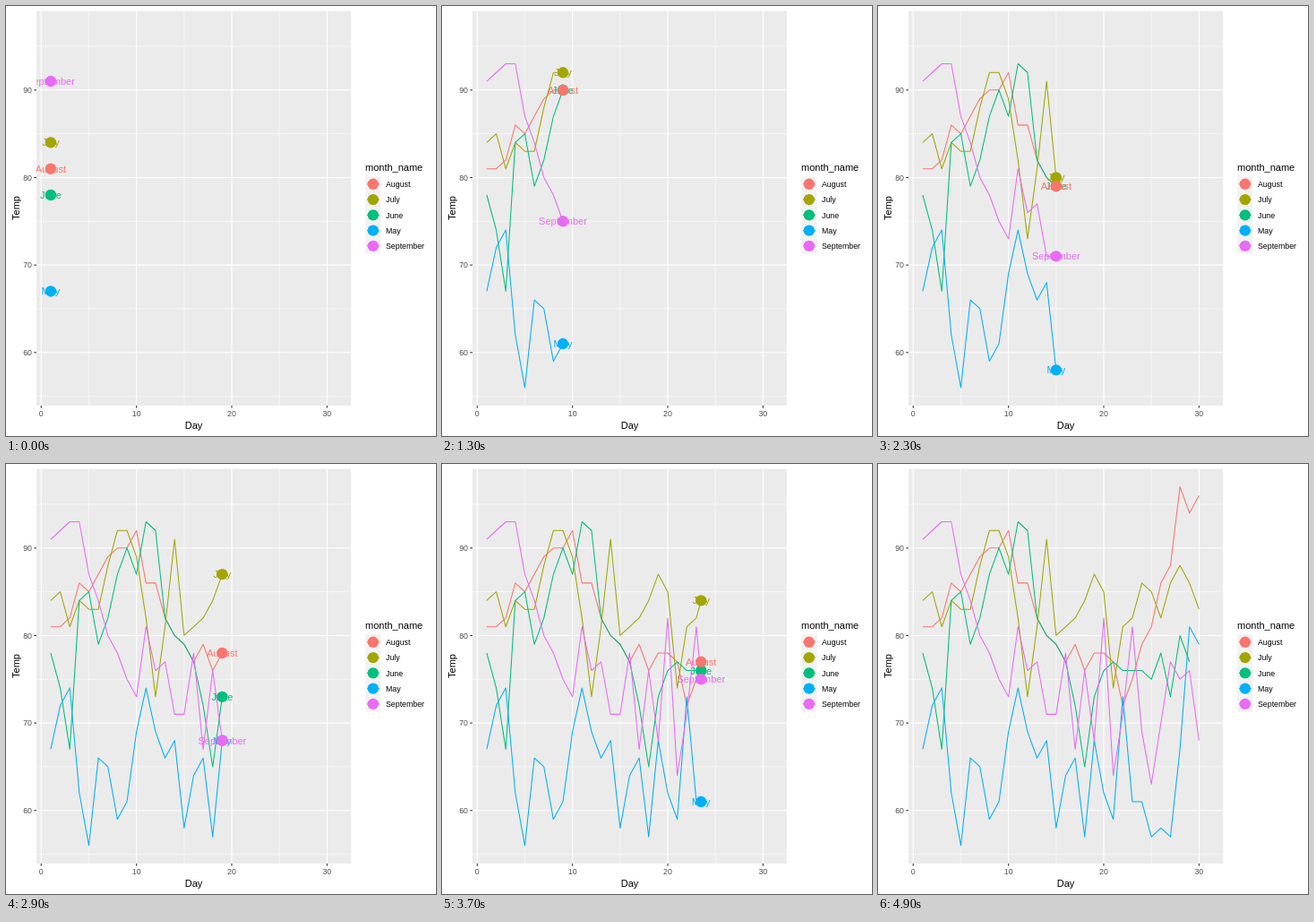
Recreate the animation shown at these times as an HTML page. Size 480x480 px, loop 5000 ms.

```html
<!DOCTYPE html>
<html lang="en">
<head>
<meta charset="utf-8">
<title>Temperature by day</title>
<style>
  html, body { margin: 0; width: 100%; height: 100%; overflow: hidden; background: #fff; }
  svg { display: block; width: 100vw; height: 100vh; }
  text { font-family: "Liberation Sans", Arial, sans-serif; font-size: 11px; }
  .small { font-size: 8.8px; }
  .mid { text-anchor: middle; }
  .end { text-anchor: end; }
  .axis { fill: #4d4d4d; }
</style>
</head>
<body>
<svg id="chart" viewBox="0 0 480 480">
  <clipPath id="panel"><rect x="34" y="5.5" width="351" height="440.5"/></clipPath>
</svg>
<script>
const STEP = 100, FRAMES = 50, DAYS = 31;
const RADIUS = 6.2, LINE = 1.07;
const LEFT = 34, TOP = 5.5, RIGHT = 385, BOTTOM = 446;

const months = [
  { name: "May", color: "#00B0F6", temps: [67, 72, 74, 62, 56, 66, 65, 59, 61, 69, 74, 69, 66, 68, 58, 64, 66, 57, 68, 62, 59, 73, 61, 61, 57, 58, 57, 67, 81, 79, 76] },
  { name: "June", color: "#00BF7D", temps: [78, 74, 67, 84, 85, 79, 82, 87, 90, 87, 93, 92, 82, 80, 79, 77, 72, 65, 73, 76, 77, 76, 76, 76, 75, 78, 73, 80, 77, 83] },
  { name: "July", color: "#A3A500", temps: [84, 85, 81, 84, 83, 83, 88, 92, 92, 89, 82, 73, 81, 91, 80, 81, 82, 84, 87, 85, 74, 81, 82, 86, 85, 82, 86, 88, 86, 83, 81] },
  { name: "August", color: "#F8766D", temps: [81, 81, 82, 86, 85, 87, 89, 90, 90, 92, 86, 86, 82, 80, 79, 77, 79, 76, 78, 78, 77, 72, 75, 79, 81, 86, 88, 97, 94, 96, 94] },
  { name: "September", color: "#E76BF3", temps: [91, 92, 93, 93, 87, 84, 80, 78, 75, 73, 81, 76, 77, 71, 71, 78, 67, 76, 68, 82, 64, 71, 81, 69, 63, 70, 77, 75, 76, 68], keepsEnd: true }
];
const byName = [...months].sort((a, b) => a.name < b.name ? -1 : 1);

const px = day => 39.3 + 10.635 * day;
const py = temp => 93.8 + 9.767 * (90 - temp);

// Each day lands on a whole step; halves round down.
const stepOf = day => Math.ceil((day - 1) * (FRAMES - 1) / (DAYS - 1) - 0.5);

const chart = document.getElementById("chart");

function add(parent, tag, attrs, content) {
  const el = document.createElementNS("http://www.w3.org/2000/svg", tag);
  for (const key in attrs) el.setAttribute(key, attrs[key]);
  if (content !== undefined) el.textContent = content;
  parent.append(el);
  return el;
}
const rule = (x1, y1, x2, y2, stroke, width) =>
  add(chart, "line", { x1, y1, x2, y2, stroke, "stroke-width": width });
const label = (x, y, text, cls = "") =>
  add(chart, "text", { x, y, class: cls }, text);

function drawAxes() {
  add(chart, "rect", { x: LEFT, y: TOP, width: RIGHT - LEFT, height: BOTTOM - TOP, fill: "#ebebeb" });
  for (const t of [55, 65, 75, 85, 95]) rule(LEFT, py(t), RIGHT, py(t), "#fff", 0.53);
  for (const d of [5, 15, 25]) rule(px(d), TOP, px(d), BOTTOM, "#fff", 0.53);
  for (const t of [60, 70, 80, 90]) {
    rule(LEFT, py(t), RIGHT, py(t), "#fff", LINE);
    rule(LEFT - 2.75, py(t), LEFT, py(t), "#333", LINE);
    label(29, py(t) + 3.2, t, "small end axis");
  }
  for (const d of [0, 10, 20, 30]) {
    rule(px(d), TOP, px(d), BOTTOM, "#fff", LINE);
    rule(px(d), BOTTOM, px(d), BOTTOM + 2.75, "#333", LINE);
    label(px(d), 458, d, "small mid axis");
  }
  label(209.5, 472, "Day", "mid");
  label(0, 0, "Temp", "mid").setAttribute("transform", "translate(14.5 225.5) rotate(-90)");
}

function drawLegend() {
  label(401, 184, "month_name");
  byName.forEach((m, i) => {
    const y = 198.8 + 17.28 * i;
    add(chart, "rect", { x: 401.2, y: y - 8.64, width: 17.28, height: 17.28, fill: "#f2f2f2" });
    rule(402.9, y, 416.8, y, m.color, LINE);
    add(chart, "circle", { cx: 409.8, cy: y, r: RADIUS, fill: m.color });
    label(424, y + 3.2, m.name, "small");
  });
}

function drawSeries() {
  const layer = () => add(chart, "g", { "clip-path": "url(#panel)" });
  const lines = layer(), names = layer(), dots = layer();
  for (const m of byName) {
    m.line = add(lines, "polyline", { fill: "none", stroke: m.color, "stroke-width": LINE, "stroke-linejoin": "round" });
  }
  for (const m of months) {
    m.tag = add(names, "text", { class: "mid", fill: m.color }, m.name);
    m.dot = add(dots, "circle", { r: RADIUS, fill: m.color });
  }
}

function pose(m, step) {
  const last = m.temps.length;
  const ended = step >= stepOf(last);
  let day = 1;
  while (day < last && stepOf(day + 1) <= step) day++;
  if (ended && !m.keepsEnd) day = last - 1;

  const points = m.temps.slice(0, day).map((t, i) => [px(i + 1), py(t)]);
  if (!ended) {
    const from = stepOf(day);
    const part = (step - from) / (stepOf(day + 1) - from);
    const temp = m.temps[day - 1] + part * (m.temps[day] - m.temps[day - 1]);
    const x = px(day + part), y = py(temp);
    points.push([x, y]);
    m.tag.setAttribute("x", x);
    m.tag.setAttribute("y", y + 4);
    m.dot.setAttribute("cx", x);
    m.dot.setAttribute("cy", y);
  }
  m.line.setAttribute("points", points.join(" "));
  for (const el of [m.tag, m.dot]) el.setAttribute("visibility", ended ? "hidden" : "visible");
}

let shown = -1;
const start = performance.now();
function tick() {
  const step = Math.floor((performance.now() - start) / STEP) % FRAMES;
  if (step !== shown) {
    shown = step;
    months.forEach(m => pose(m, step));
  }
  requestAnimationFrame(tick);
}

drawAxes();
drawLegend();
drawSeries();
tick();
</script>
</body>
</html>
```
